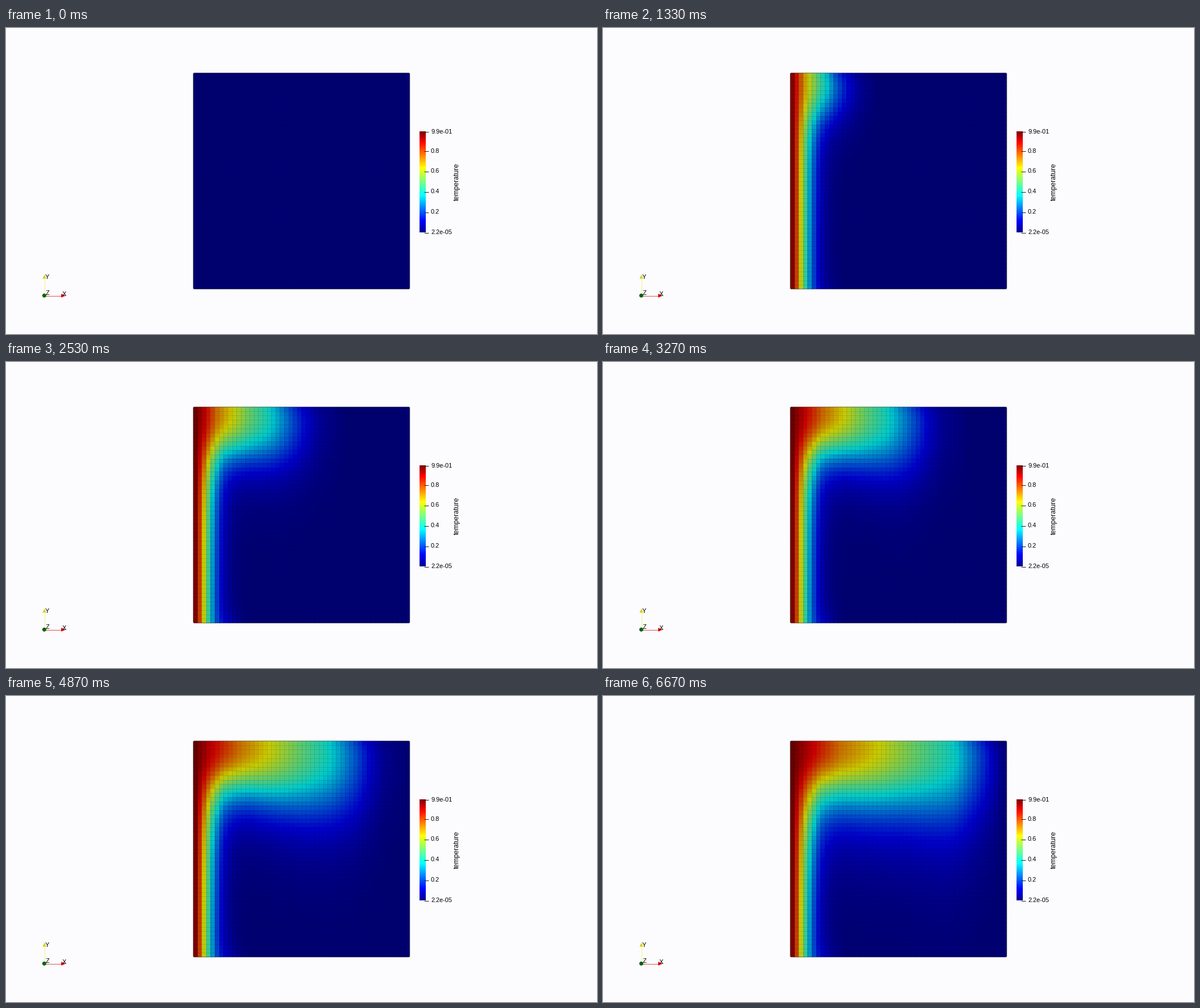
Animation, 1039 px wide and 539 px high, one loop 6790 ms. Source, as a matplotlib script:

```python
import numpy as np
import matplotlib.pyplot as plt
from matplotlib.animation import FuncAnimation
from matplotlib.collections import LineCollection
from matplotlib.colors import LinearSegmentedColormap
from matplotlib.patches import Circle, FancyBboxPatch, Polygon

W, H, DPI = 1039, 539, 64
FRAMES, INTERVAL = 97, 70
N = 50
LEFT, RIGHT, TOP, BOTTOM = 329.2, 709.8, 79.2, 459.8
T_MAX = 0.99
SHADE = 0.79

plt.rcParams["font.family"] = "Liberation Sans"

JET = LinearSegmentedColormap.from_list("heat", [
    (0.0, (0, 0, 0.5625)), (0.111, (0, 0, 1)), (0.365, (0, 1, 1)),
    (0.508, (0.5, 1, 0.5)), (0.64, (1, 1, 0)), (0.895, (1, 0, 0)),
    (1.0, (0.5, 0, 0))], N=512)

# Along the top wall: how many cells each temperature level has travelled.
KEY_TIMES = [800, 1930, 2530, 4000, 5730, 6670]
LEVELS = [1, 0.9, 0.75, 0.64, 0.51, 0.38, 0.22, 0.11, 0.04, 0]
REACH = np.array([
    [0.8, 1.8, 2.5, 3.6, 4.7, 6.5, 8.7, 11, 14],
    [1.6, 4, 6, 9, 12.3, 16, 19.5, 23, 28],
    [2.8, 5.5, 9, 13, 18, 22.7, 26.3, 30, 36],
    [4, 10.5, 16, 21.5, 28.3, 34.5, 38, 41.5, 49],
    [4.5, 11, 18.5, 27, 35, 40.5, 44, 46.7, 51],
    [5, 11.5, 20, 28.5, 38, 43, 46.5, 48.5, 51]])

# Depth of the warm layer at a few columns, then the sharpness of its lower edge.
DEPTH_COLS = [0, 7, 13, 26, 36]
DEPTH = np.array([
    [10, 10, 10, 10, 10, 0.25],
    [14, 10.5, 11.5, 12, 13, 0.25],
    [14, 11, 11.7, 14, 15, 0.25],
    [14, 11, 11.5, 16, 17, 0.2],
    [16, 12, 12.5, 14.7, 17, 0.08],
    [17, 12.5, 13, 15, 17.5, 0.04]])

cells = np.arange(N) + 0.5
X, Y = np.meshgrid(cells, cells)


def at_time(table, t):
    return np.array([np.interp(t, KEY_TIMES, col) for col in table.T])


def temperature(t):
    grow = max(np.sqrt(min(t / 800, 1)), 1e-3)
    reach = at_time(REACH, t) * grow
    *depth, sharp = at_time(DEPTH, t)

    # thin layer along the hot wall, spreading a little at the floor
    wall = np.exp(-(X / ((4.25 - 0.35 * Y / N) * grow)) ** 1.6)
    settle = np.clip((t - 800) / 1100, 0, 1)
    wall += 0.05 * settle * np.exp(-((X - 8) / 3) ** 2 - (N - Y) / 3)

    # plume under the ceiling, its nose held back right at the top
    drag = np.clip(1 - Y / 4.5, 0, 1) ** 2 * np.clip(X / reach[5], 0, 1) ** 2
    plume = np.interp(X + 1.2 * grow * drag, [0, *reach], LEVELS)
    u = Y / np.interp(X, DEPTH_COLS, depth)
    mix = 1 / (1 + u ** 3 + sharp * u ** 6)
    return wall * (1 - mix) + plume * mix


def shaded(t):
    rgb = JET(temperature(t) / T_MAX)[..., :3]
    return rgb * SHADE


def pt(px):
    return px * 72 / DPI


def label(x, y, text, size=11, **kw):
    ax.text(x, y, text, fontsize=pt(size), color="black", va="center", **kw)


def line(x, y, color, width=1, z=3):
    ax.plot(x, y, color=color, lw=pt(width), zorder=z, solid_capstyle="butt")


fig = plt.figure(figsize=(W / DPI, H / DPI), dpi=DPI, facecolor="#fcfcfe")
ax = fig.add_axes([0, 0, 1, 1])
ax.axis("off")

# temperature field
field = ax.imshow(shaded(0), extent=(LEFT, RIGHT, BOTTOM, TOP),
                  interpolation="nearest", aspect="auto", zorder=1)
edge = FancyBboxPatch((LEFT, TOP), RIGHT - LEFT, BOTTOM - TOP,
                      boxstyle="round,pad=0,rounding_size=2",
                      fc="none", ec=(0, 0, 0, 0.5), lw=pt(1), zorder=3)
ax.add_patch(edge)
field.set_clip_path(edge)

xs = np.linspace(LEFT, RIGHT, N + 1)[1:-1]
ys = np.linspace(TOP, BOTTOM, N + 1)[1:-1]
mesh = [[(x, TOP), (x, BOTTOM)] for x in xs] + [[(LEFT, y), (RIGHT, y)] for y in ys]
ax.add_collection(LineCollection(mesh, colors=[(0, 0, 0, 0.12)],
                                 linewidths=pt(0.8), zorder=2))

# colour bar
BAR_TOP, BAR_BOTTOM = 183, 360.5
ax.imshow(np.linspace(1, 0, 256)[:, None], cmap=JET, aspect="auto",
          extent=(727, 738, BAR_BOTTOM, BAR_TOP), zorder=1)
for value, text in [(0.99, "9.9e-01"), (0.8, "0.8"), (0.6, "0.6"),
                    (0.4, "0.4"), (0.2, "0.2"), (0, "2.2e-05")]:
    y = BAR_BOTTOM - (BAR_BOTTOM - BAR_TOP) * value / T_MAX
    line([735, 743], [y, y], "#202020")
    label(747, y - 0.5, text)
label(793, 271, "temperature", 12.2, ha="center", rotation=90)

# orientation axes
line([67.5, 67.5], [470, 441], "#eeee90")
line([68, 98], [471.5, 471.5], "#e05050")
ax.add_patch(Polygon([(67.5, 434.5), (64.3, 441.5), (70.7, 441.5)], fc="#d8d000", zorder=4))
ax.add_patch(Polygon([(105, 471.5), (97, 468.2), (97, 474.8)], fc="#dc0000", zorder=4))
ax.add_patch(Circle((67.3, 471.3), 3.5, fc="#006400", zorder=5))
for x, y, name in [(72, 438.5, "Y"), (102, 468.5, "X"), (72.7, 467.5, "Z")]:
    label(x, y, name, 11, ha="center", zorder=6)

ax.set_xlim(0, W)
ax.set_ylim(H, 0)


def update(i):
    field.set_data(shaded(min(i * INTERVAL, KEY_TIMES[-1])))
    return [field]


anim = FuncAnimation(fig, update, frames=FRAMES, interval=INTERVAL,
                     repeat=True, repeat_delay=0, blit=False)
plt.show()
```
